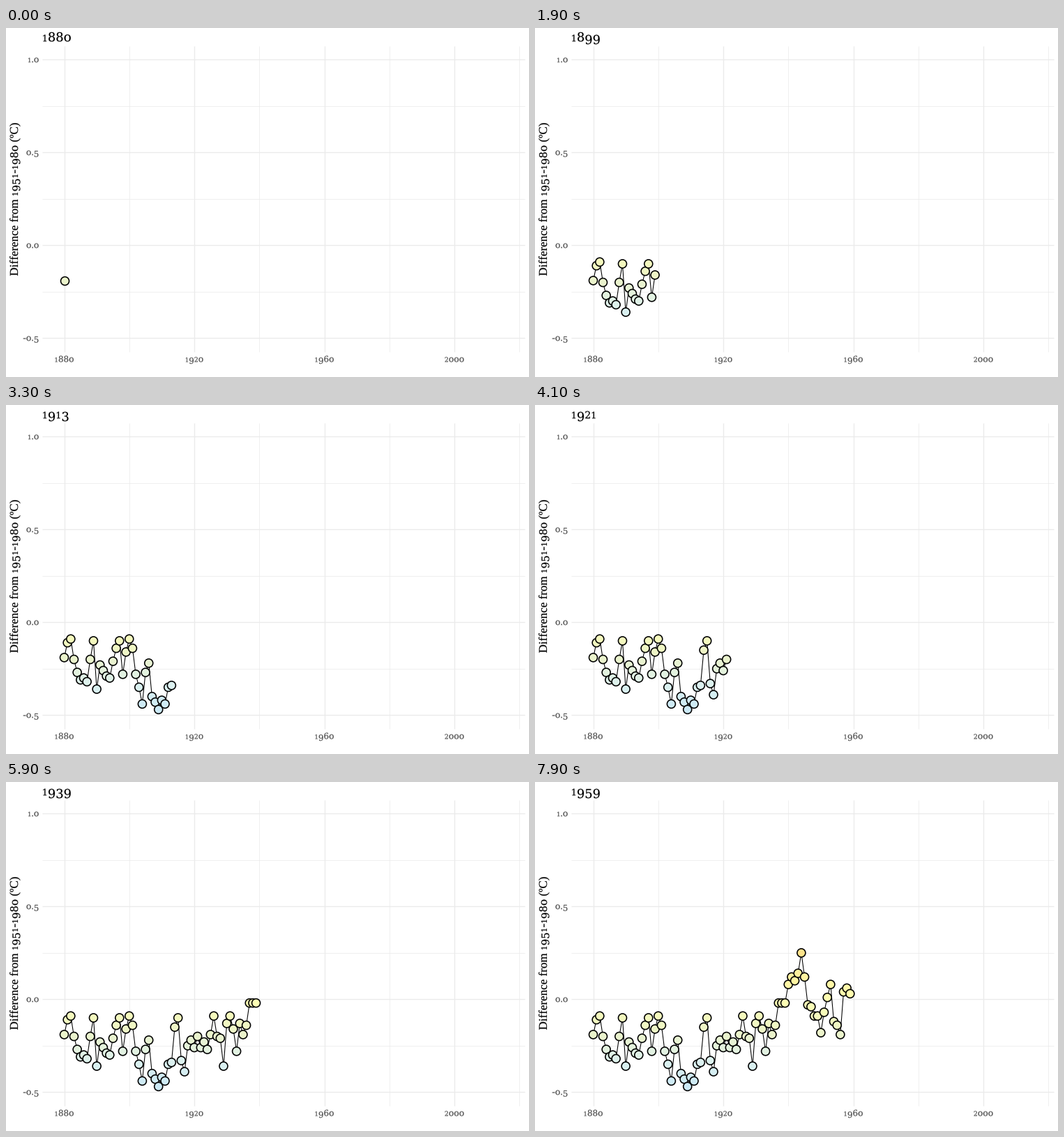
Write a matplotlib script that moves like this. It is 750 by 500 pixels and loops after 8000 ms.

```python
import matplotlib.pyplot as plt
import numpy as np
from matplotlib.animation import FuncAnimation
from matplotlib.colors import LinearSegmentedColormap, Normalize
from matplotlib.patches import PathPatch
from matplotlib.path import Path
from matplotlib.textpath import TextPath
from matplotlib.transforms import Affine2D

W, H, DPI = 750, 500, 100
PX = 72 / DPI
START = 1880

# Yearly anomalies in hundredths of a degree, one row per decade
ANOMALY = np.array([
    -19, -11, -9, -20, -27, -31, -30, -32, -20, -10,
    -36, -23, -26, -29, -30, -21, -14, -10, -28, -16,
    -9, -14, -28, -35, -44, -27, -22, -40, -43, -47,
    -42, -44, -35, -34, -15, -10, -33, -39, -25, -22,
    -26, -20, -26, -23, -27, -19, -9, -20, -21, -36,
    -13, -9, -16, -28, -13, -19, -14, -2, -2, -2,
    8, 12, 10, 14, 25, 12, -3, -4, -9, -9,
    -18, -7, 1, 8, -12, -14, -19, 4, 6, 3]) / 100

STOPS = [(-.47, "#CBE9F6"), (-.33, "#DDF2EF"), (-.20, "#EAF3CD"),
         (-.09, "#F5FABD"), (0, "#FFFFB2"), (.12, "#FFF3A0"), (.25, "#FEE38B")]
norm = Normalize(STOPS[0][0], STOPS[-1][0])
cmap = LinearSegmentedColormap.from_list("temp", [(norm(v), c) for v, c in STOPS])

# Old-style figures: short 0, 1, 2 and descending 3, 4, 5, 7, 9
SHORT = {"0": ("o", 1.04), "1": ("1", .72), "2": ("2", .79)}
DIGIT, LETTER = "DejaVu Serif", "Liberation Serif"


def x_px(year):
    return 83.5 + (year - START) * 4.6625


def y_px(temp):
    return 311.3 - temp * 266


def glyph(char, size):
    """Outline, advance width and drop below the baseline."""
    drop = 0
    if char.isdigit():
        family = DIGIT
        drop = .2 * size if char in "34579" else 0
        char, scale = SHORT.get(char, (char, 1))
        em = .93 * size * scale
    else:
        family, em = LETTER, 1.063 * size

    def outline(s):
        return TextPath((0, 0), s, size=em, prop={"family": family})

    advance = outline(char + "|").get_extents().x1 - outline("|").get_extents().x1
    return outline(char), advance, drop


def text_path(text, x, y, size, align=0, angle=0):
    parts, pen = [], 0
    for char in text:
        path, advance, drop = glyph(char, size)
        if len(path.vertices):
            parts.append(path.transformed(Affine2D().translate(pen, -drop)))
        pen += advance
    place = Affine2D().translate(-align * pen, 0).rotate_deg(angle)
    place.scale(1, -1).translate(x, y)
    return Path.make_compound_path(*parts).transformed(place)


fig = plt.figure(figsize=(W / DPI, H / DPI), dpi=DPI, facecolor="white")
ax = fig.add_axes([0, 0, 1, 1])
ax.set_xlim(0, W)
ax.set_ylim(H, 0)
ax.axis("off")


def add_text(text, x, y, size, color="black", **kw):
    patch = PathPatch(text_path(text, x, y, size, **kw), fc=color, ec=color,
                      lw=.2 * PX, zorder=5)
    return ax.add_patch(patch)


def grid(xs, ys, width):
    style = dict(color="#EBEBEB", lw=width * PX, solid_capstyle="butt", zorder=1)
    for x in xs:
        ax.plot([x, x], [25.5, 464], **style)
    for y in ys:
        ax.plot([52, 744], [y, y], **style)


years = range(1880, 2001, 40)
temps = (-.5, 0, .5, 1)
grid([x_px(v + 20) for v in years], [y_px(v) for v in (-.25, .25, .75)], .75)
grid([x_px(v) for v in years], [y_px(v) for v in temps], 1.4)

for v in years:
    add_text(str(v), x_px(v), 478.4, 12.8, "#4D4D4D", align=.5)
for v in temps:
    add_text(f"{v:.1f}", 47.3, y_px(v) + 3.8, 12.8, "#4D4D4D", align=1)
add_text("Difference from 1951-1980 (ºC)", 17, 245.5, 16, align=.5, angle=90)

title = add_text(str(START), 51.7, 19.2, 19.2)
line, = ax.plot([], [], color="black", lw=1.07 * PX, zorder=2)
dots = ax.scatter([], [], s=(12 * PX) ** 2, edgecolors="black",
                  linewidths=1.6 * PX, zorder=3)

points = np.column_stack([x_px(START + np.arange(len(ANOMALY))), y_px(ANOMALY)])
fills = cmap(norm(ANOMALY))


def update(i):
    shown = points[:i + 1]
    line.set_data(shown[:, 0], shown[:, 1])
    dots.set_offsets(shown)
    dots.set_facecolors(fills[:i + 1])
    title.set_path(text_path(str(START + i), 51.7, 19.2, 19.2))
    return line, dots, title


anim = FuncAnimation(fig, update, frames=len(ANOMALY), interval=100,
                     repeat=True, repeat_delay=0, blit=False)
plt.show()
```
